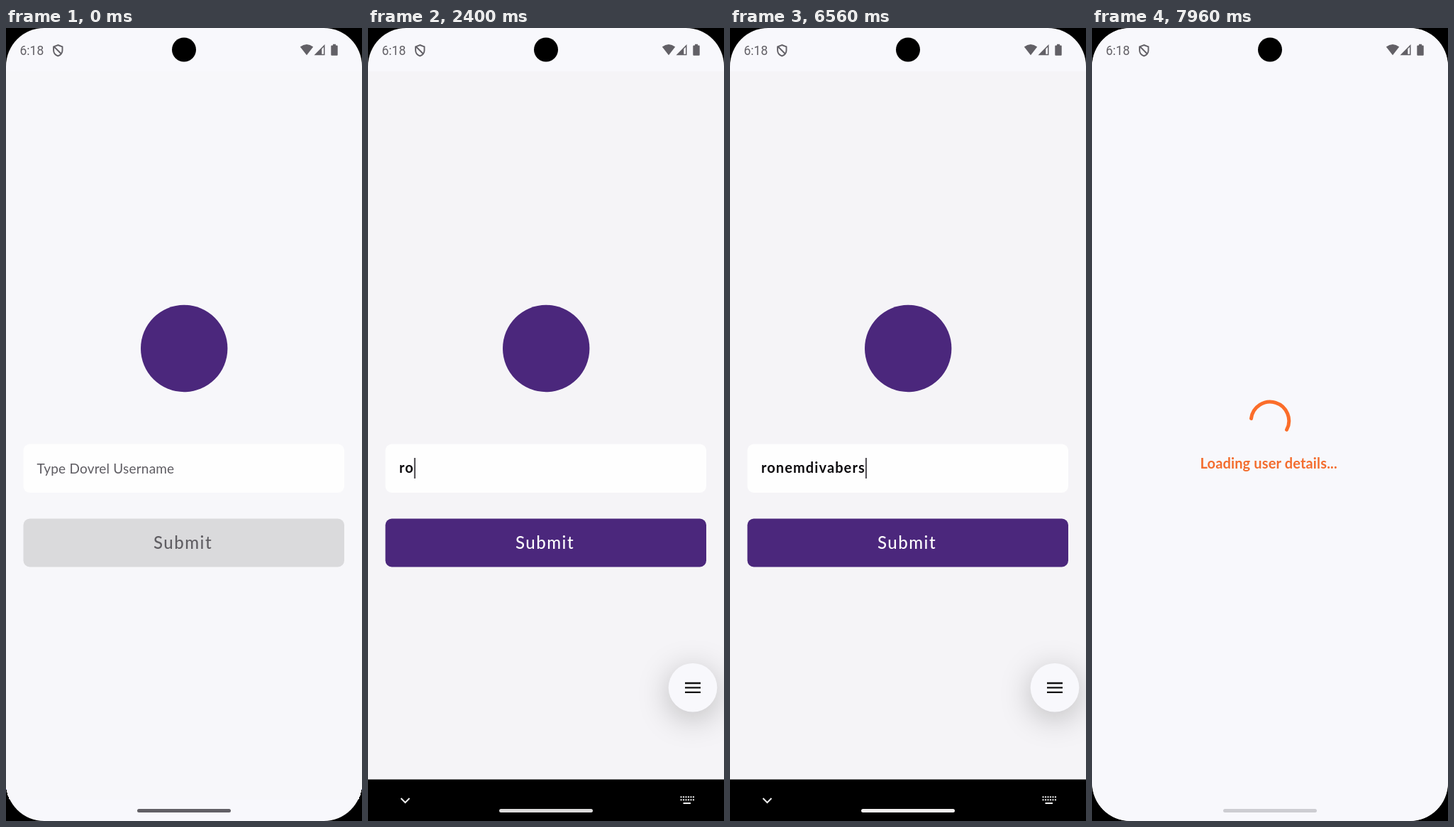
Write an HTML page that moves like this. It is 502 px wide and 1116 px high and loops after 8 s.

```html
<!DOCTYPE html>
<html lang="en">
<head>
<meta charset="utf-8">
<title>Sign-in form</title>
<style>
  html, body { margin: 0; width: 100%; height: 100%; overflow: hidden; background: #000; }
  svg { display: block; width: 502px; height: 1116px; }
  text { font-family: Lato, "Open Sans", sans-serif; white-space: pre; }

  .anim { animation: 8s linear infinite both; }
  #page { animation-name: settle; }
  #form { animation-name: leave; }
  #loading { animation-name: enter; }
  #tapField { animation-name: tapField; }
  #tapButton { animation-name: tapButton; }
  #ripple { animation-name: ripple; transform-origin: 220px 724px; }
  #bar { animation-name: bar; }
  #fab { animation-name: fab; }
  #pill { animation-name: pill; }

  @keyframes settle { 0% { fill: #f7f7fa; } 6%, 100% { fill: #f5f4f7; } }
  @keyframes leave {
    0%, 87.5% { opacity: 1; animation-timing-function: cubic-bezier(.4, 0, .2, 1); }
    96.25%, 100% { opacity: 0; }
  }
  @keyframes enter {
    0%, 87.5% { opacity: 0; animation-timing-function: cubic-bezier(.4, 0, .2, 1); }
    96.25%, 100% { opacity: 1; }
  }
  @keyframes tapField { 0%, 11.9% { opacity: 0; } 12%, 13.4% { opacity: 1; } 13.5%, 100% { opacity: 0; } }
  @keyframes tapButton { 0%, 86.4% { opacity: 0; } 86.5%, 87.9% { opacity: 1; } 88%, 100% { opacity: 0; } }
  @keyframes ripple {
    0%, 86.9% { opacity: 0; transform: scale(.1); }
    87% { opacity: .12; transform: scale(.1); }
    89.5% { opacity: .1; transform: scale(1); }
    91%, 100% { opacity: 0; transform: scale(1); }
  }
  @keyframes bar {
    0%, 14.5% { transform: translateY(59px); animation-timing-function: cubic-bezier(0, 0, .2, 1); }
    18%, 92.5% { transform: none; animation-timing-function: cubic-bezier(.4, 0, 1, 1); }
    95.5%, 100% { transform: translateY(59px); }
  }
  @keyframes fab { 0%, 16.5% { opacity: 0; } 19%, 92.5% { opacity: 1; } 95%, 100% { opacity: 0; } }
  @keyframes pill {
    0%, 15% { fill: #626066; }
    20% { fill: #b4b4b6; }
    30% { fill: #dcdbdb; }
    36%, 92.5% { fill: #f2f0f0; }
    95.5%, 100% { fill: #cdcdd2; }
  }

  .tap { fill: #fff; fill-opacity: .25; stroke: #b9c5de; stroke-width: 2; }
  .status { fill: #626066; }
  #hint { font-size: 19px; letter-spacing: .2px; fill: #5f5d63; }
  #typed { font-size: 20px; font-weight: 700; letter-spacing: 1.1px; fill: #0d0b0e; }
  #submit rect { fill: #dadadc; }
  #submit text { font-size: 24px; font-weight: 500; letter-spacing: 1.5px; fill: #605e63; }
  .ready #submit rect { fill: #4b277c; }
  .ready #submit text { fill: #fff; }
  .ready #hint { display: none; }
  #loading text { font-size: 20px; font-weight: 700; letter-spacing: .15px; fill: #f36d2e; }
  #arc { fill: none; stroke: #fb6d2a; stroke-width: 5; stroke-linecap: round; }
  #disc { filter: drop-shadow(0 9px 22px rgba(0, 0, 0, .24)); }
</style>
</head>
<body>
<svg viewBox="0 0 502 1116">
  <defs>
    <clipPath id="screen"><rect width="502" height="1116" rx="54"/></clipPath>
    <clipPath id="buttonClip"><rect x="24.5" y="690.5" width="452.5" height="68" rx="9"/></clipPath>
  </defs>
  <rect width="502" height="1116"/>
  <g clip-path="url(#screen)">
    <rect width="502" height="1116" fill="#f8f8fc"/>

    <g id="form" class="anim">
      <rect id="page" class="anim" y="61" width="502" height="1025"/>
      <circle cx="251.2" cy="451" r="61.2" fill="#4b277c"/>
      <rect x="24.5" y="585.5" width="452.5" height="68.5" rx="9" fill="#fefefe"/>
      <text id="hint" x="43.5" y="626.5">Type Dovrel Username</text>
      <text id="typed" x="44" y="626"></text>
      <rect id="caret" y="605" width="2.2" height="29" fill="#59575c"/>
      <g id="submit">
        <rect x="24.5" y="690.5" width="452.5" height="68" rx="9"/>
        <text x="208" y="733">Submit</text>
      </g>
      <g clip-path="url(#buttonClip)">
        <circle id="ripple" class="anim" cx="220" cy="724" r="262" fill="#fff"/>
      </g>
    </g>

    <g id="loading" class="anim">
      <rect width="502" height="1116" fill="#f8f8fc"/>
      <path id="arc"/>
      <text x="152.5" y="620">Loading user details...</text>
    </g>

    <circle id="tapField" class="anim tap" cx="87.5" cy="632" r="10.3"/>
    <circle id="tapButton" class="anim tap" cx="220" cy="724" r="10.3"/>

    <g class="status">
      <text x="19.5" y="38" style="font: 17.5px Roboto, sans-serif">6:18</text>
      <path d="M73.3 24 l6.2 2.4 v5 q0 5.5 -6.2 8 q-6.2 -2.500 -6.2 -8 v-5 z M68 26.500 L78 36.500" fill="none" stroke="#626066" stroke-width="1.9"/>
      <path d="M414.800 26.500 Q424 19.500 433.200 26.500 L424 38.200 Z"/>
      <path fill-rule="evenodd" d="M434.500 38.300 L449.500 23 V38.300 Z M445.300 29.500 V36.800 H448 V26.700 Z"/>
      <path d="M461 22.800 h4 v1.700 h1.700 q1 0 1 1 v12.300 q0 1 -1 1 h-7.400 q-1 0 -1 -1 v-12.300 q0 -1 1 -1 h1.700 z"/>
    </g>
    <circle cx="251" cy="30.500" r="17"/>
  </g>

  <g id="fab" class="anim">
    <circle id="disc" cx="458" cy="928.300" r="34.300" fill="#f8f8fc"/>
    <path d="M447 922 h22 M447 928.400 h22 M447 934.800 h22" stroke="#111" stroke-width="2.300"/>
  </g>
  <g id="bar" class="anim">
    <rect y="1057.500" width="502" height="59"/>
    <path d="M46.500 1084 l6 6 l6 -6" fill="none" stroke="#eee" stroke-width="2"/>
    <path d="M440.500 1082.300 h19.500 M440.500 1086.300 h19.500" stroke="#eee" stroke-width="2.100" stroke-dasharray="2.100 1.380"/>
    <path d="M444.500 1091 h10.500" stroke="#eee" stroke-width="2.100"/>
  </g>
  <rect id="pill" class="anim" x="185" y="1099" width="132" height="5" rx="2.500"/>
</svg>

<script>
  const LOOP = 8000;
  const NAME = 'ronemdivabers';
  const KEYS = [1800, 2240, 2480, 2640, 3000, 3640, 3840, 4200, 4720, 5200, 5520, 5840, 6100];
  const FOCUS = 1100;
  const BLINK = 500;

  const $ = id => document.getElementById(id);
  const form = $('form'), typed = $('typed'), caret = $('caret'), arc = $('arc');

  // Solves cubic-bezier(.4, 0, .2, 1) by bisection.
  function ease(x) {
    if (x <= 0) return 0;
    if (x >= 1) return 1;
    let lo = 0, hi = 1, s;
    for (let i = 0; i < 24; i++) {
      s = (lo + hi) / 2;
      const at = 1.2 * (1 - s) ** 2 * s + .6 * (1 - s) * s * s + s ** 3;
      if (at < x) lo = s; else hi = s;
    }
    return 3 * (1 - s) * s * s + s ** 3;
  }

  function drawTyping(t) {
    const count = KEYS.filter(k => k <= t).length;
    const lastKey = count ? KEYS[count - 1] : FOCUS;
    const on = t >= FOCUS && Math.floor((t - lastKey) / BLINK) % 2 === 0;
    typed.textContent = NAME.slice(0, count);
    form.classList.toggle('ready', count > 0);
    caret.setAttribute('x', 44 + (count ? typed.getComputedTextLength() : 0));
    caret.style.visibility = on ? 'visible' : 'hidden';
  }

  // Head runs for half a cycle, then the tail catches up, over a steady turn.
  function drawSpinner(t) {
    const cycle = Math.max(0, (t - 7143) * 1.04) / 1332;
    const head = 290 * ease(cycle * 2);
    const tail = 290 * ease(cycle * 2 - 1);
    const turn = 286 * cycle - 84.6;
    const point = deg => {
      const a = deg * Math.PI / 180;
      return `${251 + 26.7 * Math.cos(a)} ${552.8 + 26.7 * Math.sin(a)}`;
    };
    const large = head - tail > 180 ? 1 : 0;
    arc.setAttribute('d', `M${point(turn + tail)} A26.7 26.7 0 ${large} 1 ${point(turn + head + .1)}`);
  }

  const clock = form.getAnimations()[0];

  function frame(now) {
    const start = (clock && clock.startTime) || 0;
    const t = Math.max(0, now - start) % LOOP;
    drawTyping(t);
    drawSpinner(t);
    requestAnimationFrame(frame);
  }
  requestAnimationFrame(frame);
</script>
</body>
</html>
```
